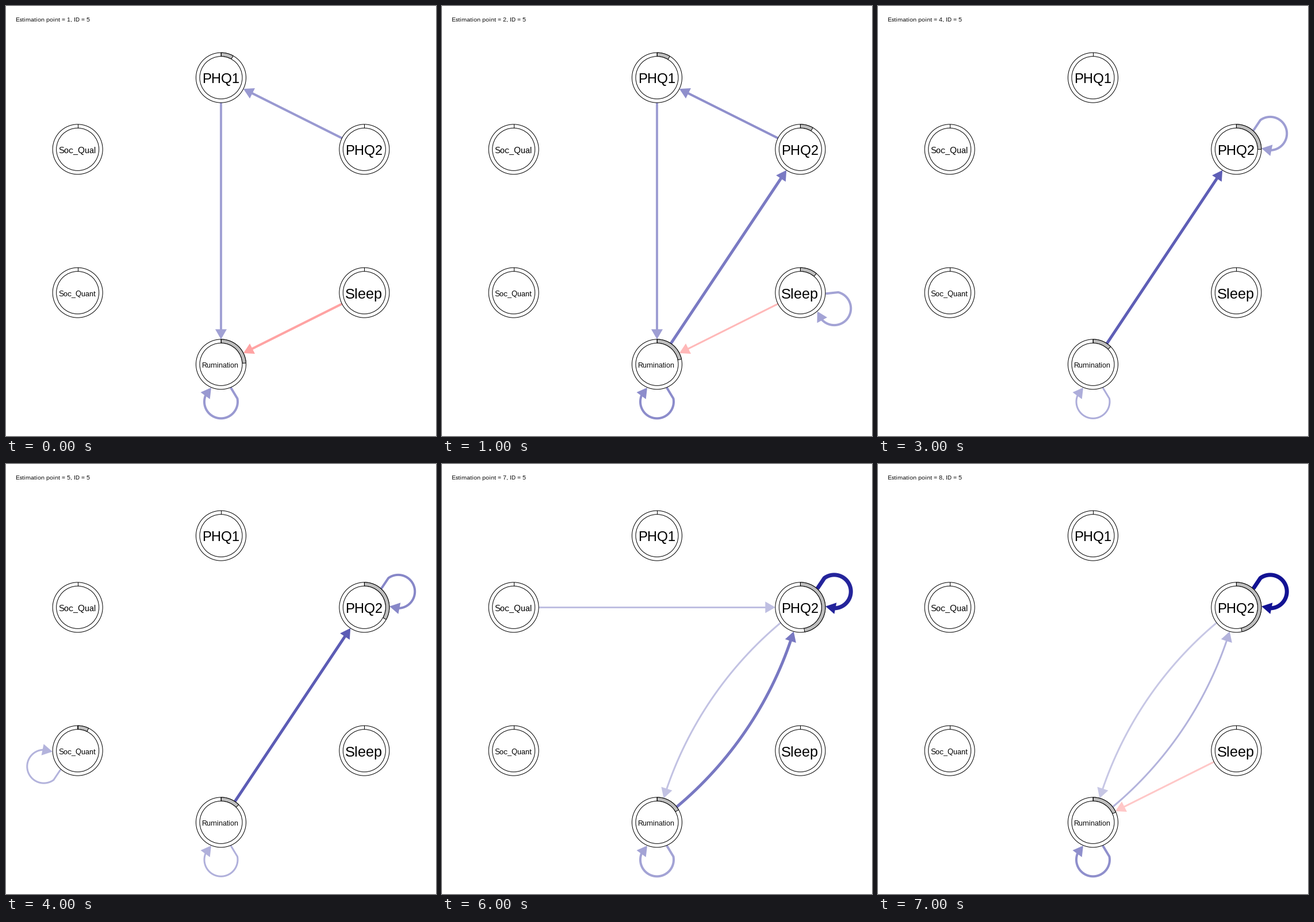
A matplotlib script that plays this animation: 748x748 px, repeating every 8 s.

```python
import numpy as np
import matplotlib.pyplot as plt
from matplotlib.animation import FuncAnimation
from matplotlib.patches import Circle, Polygon, Wedge

SIZE, DPI = 748, 100
PX = 72 / DPI                      # points per pixel
OUTER, INNER = 43.5, 37
BEND = 40                          # bulge of edges that run both ways
HEAD_LEN, HEAD_HALF = 17.5, 10
BLUE, RED = np.array([0, 0, 139]) / 255, np.array([1.0, 0, 0])

A, B, C, D = SIZE / 6, SIZE / 3, SIZE * 2 / 3, SIZE * 5 / 6
# name: (x, y, font px, loop direction in degrees, y down)
NODES = {
    "PHQ1": (SIZE / 2, A, 24, -90),
    "PHQ2": (D, B, 24, -25),
    "Sleep": (D, C, 25, 25),
    "Rumination": (SIZE / 2, D, 12, 90),
    "Soc_Quant": (A, C, 13, 155),
    "Soc_Qual": (A, B, 15, 205),
}
P1, P2, SL, RU, QN, QL = NODES

# Each step: edge weights (negative is red) and ring fills in degrees
STEPS = [
    ({(P2, P1): .40, (P1, RU): .37, (SL, RU): -.36, (RU, RU): .40},
     {P1: 29, RU: 87}),
    ({(P2, P1): .44, (P1, RU): .38, (RU, P2): .52, (SL, SL): .36,
      (SL, RU): -.28, (RU, RU): .45},
     {P1: 31, P2: 30, SL: 40, RU: 78}),
    ({(P2, P1): .25, (P1, RU): .21, (RU, P2): .62, (P2, P2): .29,
      (RU, RU): .33},
     {P1: 22, P2: 60, RU: 46}),
    ({(RU, P2): .63, (P2, P2): .38, (RU, RU): .32},
     {P2: 90, RU: 45}),
    ({(RU, P2): .64, (P2, P2): .47, (QN, QN): .30, (RU, RU): .31},
     {P2: 119, QN: 26, RU: 45}),
    ({(P1, P2): .29, (QL, P2): .38, (P2, P2): .79, (P2, RU): .24,
      (RU, P2): .75, (RU, RU): .36},
     {P2: 172, RU: 55}),
    ({(QL, P2): .25, (P2, P2): .86, (P2, RU): .24, (RU, P2): .53,
      (RU, RU): .36},
     {P2: 170, RU: 60}),
    ({(P2, P2): .93, (P2, RU): .22, (RU, P2): .30, (SL, RU): -.22,
      (RU, RU): .44},
     {P2: 167, RU: 66}),
]

# Whole-pixel hinting keeps the small labels crisp
plt.rcParams.update({"font.family": "Liberation Sans",
                     "text.hinting": "native", "text.hinting_factor": 1})
fig = plt.figure(figsize=(SIZE / DPI, SIZE / DPI), dpi=DPI, facecolor="white")
ax = fig.add_axes([0, 0, 1, 1])


def center(name):
    return np.array(NODES[name][:2])


def edge_path(src, dst, bend):
    """Rim-to-rim line, or a circular arc through both centres."""
    a, b = center(src), center(dst)
    half = np.hypot(*(b - a)) / 2
    along = (b - a) / (2 * half)
    side = np.array([-along[1], along[0]])
    if bend:
        radius = (half**2 + bend**2) / (2 * bend)
        end = 2 * np.arctan(bend / half) - 2 * np.arcsin(OUTER / (2 * radius))
        t = np.linspace(-end, end, 200)
        s, off = radius * np.sin(t), radius * np.cos(t) - radius + bend
    else:
        s = np.linspace(OUTER - half, half - OUTER, 200)
        off = np.zeros_like(s)
    return (a + b) / 2 + np.outer(s, along) + np.outer(off, side)


def loop_path(name):
    turn = np.radians(NODES[name][3])
    out = np.array([np.cos(turn), np.sin(turn)])
    side = np.array([out[1], -out[0]])
    t = np.radians(np.linspace(-11, 203, 60))
    u = np.r_[40.5, 65 + 29 * np.sin(t), 40.5]
    v = np.r_[17, 29 * np.cos(t), -17]
    return center(name) + np.outer(u, out) + np.outer(v, side)


def draw_arrow(path, weight):
    w = abs(weight)
    color = 1 - w + w * (BLUE if weight > 0 else RED)
    tip = path[-1]
    shaft = path[np.hypot(*(path - tip).T) > HEAD_LEN - 1.5]
    ax.plot(*shaft.T, color=color, lw=round(1.2 + 6.7 * w) * PX, zorder=1,
            solid_capstyle="butt", solid_joinstyle="round")
    d = tip - shaft[-1]
    d /= np.hypot(*d)
    base, wing = tip - HEAD_LEN * d, HEAD_HALF * np.array([-d[1], d[0]])
    ax.add_patch(Polygon([tip, base + wing, base - wing], fc=color, ec="none",
                         zorder=1.5))


def draw_node(name, fill):
    x, y, font, _ = NODES[name]
    style = dict(ec="black", lw=PX)
    ax.add_patch(Circle((x, y), OUTER, fc="white", zorder=2, **style))
    if fill:
        ax.add_patch(Wedge((x, y), OUTER, -90, fill - 90, width=OUTER - INNER,
                           fc="#bebebe", zorder=3, **style))
    ax.plot([x, x], [y - OUTER, y - INNER], color="black", lw=PX, zorder=3)
    ax.add_patch(Circle((x, y), INNER, fc="white", zorder=4, **style))
    ax.text(x - .7, y + 1 + .36 * font, name, fontsize=font * PX, ha="center",
            va="baseline", zorder=5)


def update(i):
    ax.clear()
    ax.set(xlim=(0, SIZE), ylim=(SIZE, 0))
    ax.axis("off")
    edges, fills = STEPS[i]
    for (src, dst), weight in edges.items():
        if src == dst:
            path = loop_path(src)
        else:
            path = edge_path(src, dst, BEND if (dst, src) in edges else 0)
        draw_arrow(path, weight)
    for name in NODES:
        draw_node(name, fills.get(name, 0))
    ax.text(17.5, 26.5, f"Estimation point = {i + 1}, ID = 5",
            fontsize=10 * PX, va="baseline")
    return []


anim = FuncAnimation(fig, update, frames=len(STEPS), interval=1000,
                     init_func=lambda: update(0), repeat=True, repeat_delay=0)
plt.show()
```
